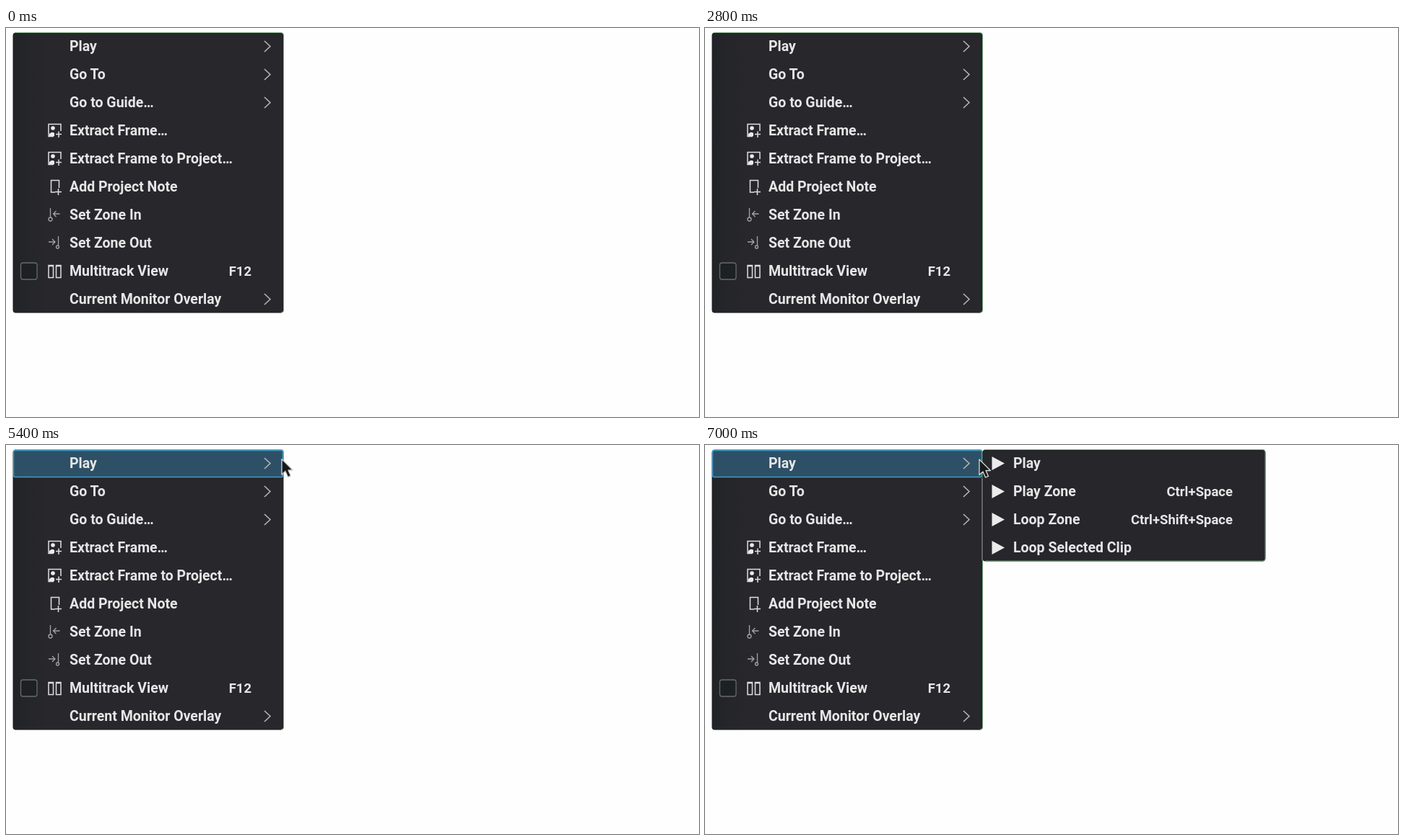
An HTML page for the animation above (8 s loop, 960 by 540 pixels).

```html
<!DOCTYPE html>
<html lang="en">
<head>
<meta charset="utf-8">
<title>Monitor menu</title>
<style>
  html, body { margin: 0; width: 100%; height: 100%; overflow: hidden; background: #fefefe; }
  svg { display: block; width: 100%; height: 100%; }
  text { font: 600 19.5px Roboto, "Open Sans", sans-serif; fill: #e6e6e7; }
  .line { fill: none; stroke: #dededf; stroke-width: 1.5; }
  .dim { stroke: #a3a3a7; stroke-width: 1.3; }
  .solid { fill: #ebebec; }
  .chevron { fill: none; stroke: #b4b4b7; stroke-width: 1.6; }
  .key { font-size: 18.5px; text-anchor: end; }
  .edge { fill: none; stroke: #6fa377; stroke-width: 1; }
  #highlight, #submenu, #cursor { opacity: 0; }
</style>
</head>
<body>
<svg viewBox="0 0 960 540">
  <defs>
    <linearGradient id="panel">
      <stop offset="0" stop-color="#202327"/>
      <stop offset=".06" stop-color="#25262a"/>
      <stop offset=".12" stop-color="#28272b"/>
    </linearGradient>
    <g id="frame-icon">
      <path class="line" d="M66 150.500H59V133.500H76V143M69 147.500H77M73 143.500V152"/>
      <circle class="solid" cx="65" cy="139" r="2.800"/>
      <path class="solid" d="M60 150V147Q64 143 67 146V150Z"/>
    </g>
    <path id="arrow" class="line dim" d="M4-4L0 0L4 4M0 0H9"/>
  </defs>

  <rect x="10" y="7" width="374" height="388" rx="3" fill="url(#panel)" stroke="#1a1d1e"/>
  <path class="edge" d="M12 6.500H381Q384.500 6.500 384.500 10V392Q384.500 395 381 395"/>
  <rect id="highlight" x="10.500" y="7.500" width="373" height="37" rx="2" fill="#2d5066" stroke="#419bcb" stroke-width="1.300"/>
  <g id="rows"></g>

  <use href="#frame-icon"/>
  <use href="#frame-icon" y="39"/>
  <path class="line" d="M68 228H62.500V211.500H73.500V222M68 227.500H77M72.500 223V232"/>
  <path class="line dim" d="M61.500 250V263"/>
  <circle class="line dim" cx="61.500" cy="265.500" r="2.500"/>
  <use href="#arrow" x="65.500" y="258"/>
  <path class="line dim" d="M72.500 289V302"/>
  <circle class="line dim" cx="71.500" cy="304" r="2"/>
  <use href="#arrow" transform="translate(68 297) scale(-1 1)"/>
  <path class="line" d="M59 329.500H65.500V346.500H59ZM69.500 329.500H76V346.500H69.500ZM58.500 330.500H66M69 330.500H76.500"/>
  <rect x="20.500" y="326" width="22.500" height="23" rx="3" fill="#1d2024" stroke="#67696d" stroke-width="1.300"/>

  <g id="submenu">
    <rect x="385" y="7" width="391" height="154" rx="3" fill="#27262b" stroke="#1a1d1e"/>
    <path class="edge" d="M387 6.500H773Q776 6.500 776 10V158Q776 161 773 161H388"/>
    <path d="M384 46V160" stroke="#65666a" stroke-width="2"/>
  </g>

  <path id="cursor" d="M0 0V21.500L5 17L8.500 25L12.500 23.300L9 15.500H15.500Z" fill="#17181b" stroke="#d5dad5" stroke-width="1.300" stroke-linejoin="round"/>
</svg>
<script>
const LOOP = 8000, ROW = 39;
const find = id => document.getElementById(id);

function add(parent, tag, attrs, text = "") {
  const node = document.createElementNS("http://www.w3.org/2000/svg", tag);
  for (const name in attrs) node.setAttribute(name, attrs[name]);
  node.textContent = text;
  parent.append(node);
}

function addRow(parent, index, x, label, keyX, key) {
  const y = 32 + index * ROW;
  add(parent, "text", { x, y }, label);
  if (key) add(parent, "text", { x: keyX, y, class: "key" }, key);
}

const rows = find("rows");
[["Play"], ["Go To"], ["Go to Guide…"], ["Extract Frame…"], ["Extract Frame to Project…"],
 ["Add Project Note"], ["Set Zone In"], ["Set Zone Out"], ["Multitrack View", "F12"],
 ["Current Monitor Overlay"]].forEach(([label, key], i) => addRow(rows, i, 88, label, 340, key));
for (const i of [0, 1, 2, 9])
  add(rows, "path", { class: "chevron", d: `M358 ${18 + i * ROW}l8 7.500l-8 7.500` });

const submenu = find("submenu");
[["Play"], ["Play Zone", "Ctrl+Space"], ["Loop Zone", "Ctrl+Shift+Space"],
 ["Loop Selected Clip"]].forEach(([label, key], i) => {
  add(submenu, "path", { class: "solid", d: `M397.500 ${16 + i * ROW}l17.500 9.500l-17.500 9.500z` });
  addRow(submenu, i, 427, label, 731, key);
});

// Each step holds its state until the next one.
const startTime = document.timeline.currentTime ?? performance.now();
function play(id, steps) {
  const frames = steps.map(([time, state]) => ({ offset: time / LOOP, easing: "step-end", ...state }));
  frames.push({ ...frames.at(-1), offset: 1 });
  find(id).animate(frames, { duration: LOOP, iterations: Infinity }).startTime = startTime;
}

const shown = { opacity: 1 }, hidden = { opacity: 0 };
const at = (x, y) => ({ opacity: 1, transform: `translate(${x}px, ${y}px)` });

play("highlight", [[0, hidden], [5200, shown]]);
play("submenu", [[0, hidden], [5500, shown]]);
play("cursor", [
  [0, { ...at(366, -26), opacity: 0 }],
  [5100, at(370, -6)], [5200, at(377, 12)], [5300, at(381, 18)], [5400, at(382, 19.5)],
  [6700, at(381.5, 19.5)], [6800, at(381, 19.5)], [6900, at(380.5, 20)], [7000, at(380, 20)]
]);
</script>
</body>
</html>
```
